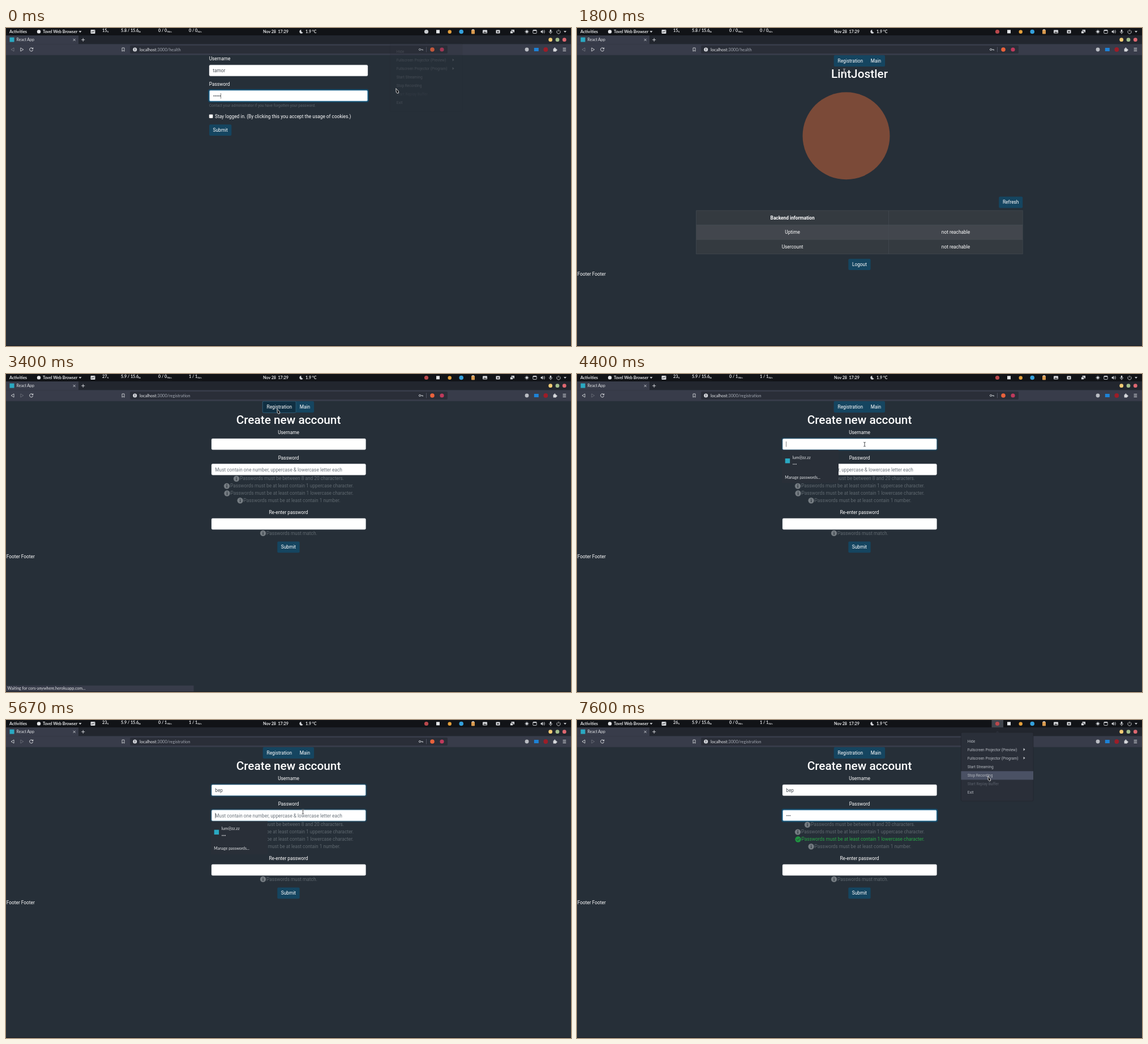
Write an HTML page that moves like this. It is 998 px wide and 561 px high and loops after 7740 ms.

```html
<!DOCTYPE html>
<html lang="en">
<head>
<meta charset="utf-8">
<title>Sign-up walkthrough</title>
<style>
html, body { margin: 0; width: 100%; height: 100%; overflow: hidden; background: #262f38; }
svg { display: block; width: 100vw; height: 100vh; }
text { font-family: Roboto, sans-serif; white-space: pre; }
.ui { font-family: Lato, "Noto Sans", sans-serif; }
.b { font-weight: 700; }
.h { font-weight: 500; }
</style>
</head>
<body>
<svg id="stage" viewBox="0 0 998 561" xmlns="http://www.w3.org/2000/svg"></svg>
<script>
const LOOP = 7740;
const BLUE = '#154560', BLUE_DARK = '#102f42', TEAL = '#2aa9c2', MUTED = '#5f686f', GREEN = '#28a745';

// Markup helpers; text is placed by its vertical centre
const text = (x, cy, s, o = {}) => {
  const size = o.size || 8.32;
  return `<text x="${x}" y="${(cy + size * 0.35).toFixed(2)}" font-size="${size}" fill="${o.fill || '#fff'}"` +
    ` class="${o.cls || ''}" text-anchor="${o.mid ? 'middle' : 'start'}" ${o.id ? `id="${o.id}"` : ''}>${s}</text>`;
};
const ui = (x, cy, s, size, fill = '#e3e5e8', id) => text(x, cy, s, { size, fill, id, cls: 'ui' });
const bold = (x, cy, s, size = 7.2, id) => text(x, cy, s, { size, id, fill: '#e6e7e9', cls: 'ui b' });
const mid = (cy, s, o = {}) => text(499, cy, s, { mid: 1, ...o });
const rect = (x, y, w, h, fill, extra = '') =>
  `<rect x="${x}" y="${y}" width="${w}" height="${h}" fill="${fill}" ${extra}/>`;
const dot = (x, y, r, fill, extra = '') => `<circle cx="${x}" cy="${y}" r="${r}" fill="${fill}" ${extra}/>`;
const line = (d, stroke = '#d5d7db', w = 0.8, extra = '') =>
  `<path d="${d}" fill="none" stroke="${stroke}" stroke-width="${w}" ${extra}/>`;
const shape = (d, fill = '#d5d7db') => `<path d="${d}" fill="${fill}"/>`;
const group = (id, body) => `<g id="${id}">${body}</g>`;

const button = (x, y, w, label, id = '') =>
  rect(x, y, w, 19.8, BLUE, `rx="2" ${id ? `id="${id}"` : ''}`) +
  text(x + w / 2, y + 9.8, label, { mid: 1 });
const ring = (id, x, y, w, h) =>
  `<g id="${id}">` +
  rect(x - 1, y - 1, w + 2, h + 2, 'none', `rx="2.8" stroke="${BLUE}" stroke-width="2"`) +
  rect(x + 0.2, y + 0.2, w - 0.4, h - 0.4, 'none', 'rx="2" stroke="#2a7bab" stroke-width=".8"') + '</g>';
const input = (x, y, w, ringId) =>
  rect(x, y, w, 19.6, '#fff', 'rx="2.1" stroke="#ced4da" stroke-width=".4"') +
  (ringId ? ring(ringId, x, y, w, 19.6) : '');
const bullets = (x, y, n, cls) =>
  Array.from({ length: n }, (_, i) => dot(x + i * 2.75, y, 0.95, '#495057', `class="${cls}"`)).join('');
const caret = (id, y) => rect(0, y, 0.6, 9.6, '#333', `id="${id}"`);
const hint = (x, cy, s, ok) => {
  const mark = ok
    ? line(`M${x - 2.5} ${cy}l1.8 1.9l3.3 -3.6`, '#26313a', 1)
    : rect(x - 0.6, cy - 0.8, 1.3, 3.6, '#262f38') + dot(x, cy - 2.2, 0.8, '#262f38');
  return dot(x, cy, 5.2, ok ? '#1f9440' : '#747b81') + mark +
    text(x + 6, cy - 0.3, s, { fill: ok ? GREEN : MUTED });
};

function chromeBars() {
  const stat = (x, id, unit, unitX) => bold(x, 4.4, '', 7.2, id) + bold(unitX, 6.6, unit, 3.4);
  const top = rect(0, 0, 998, 13.2, '#111317') + rect(732.5, 0, 20.5, 13.2, '#41454d', 'id="trayBg"') +
    bold(6, 6.5, 'Activities', 7.4) + dot(58, 6.4, 3.2, '#e6e7e9') + bold(65, 6.5, 'Tovel Web Browser', 7.1) +
    shape('M128.5 5.2h5l-2.5 3z') +
    rect(149.5, 3, 8, 7, '#d5d7db', 'rx="1"') + line('M151 8l1.6-2 1.4 1.2 2-2.7', '#222', 0.8) +
    stat(170, 'cpu', '%', 178.6) + stat(203, 'mem', 'Gb', 233.5) +
    stat(269, 'disk', 'Mb/s', 284.8) + stat(323, 'net', 'Kb/s', 338.4) +
    bold(454, 6.5, 'Nov 28  17:29', 7.15) +
    shape('M521.5 3a3.4 3.4 0 1 0 3.2 5a3.6 3.6 0 0 1 -3.2 -5z') + bold(529, 6.5, '1.9 °C') +
    dot(742.5, 6.5, 3.6, '#c9ccd0', 'id="tray"') + rect(760, 3.4, 6, 6, '#e4e6e8') +
    dot(783.7, 6.8, 3.2, '#e4a03c') + dot(804.2, 6.5, 3.8, '#34a0db') +
    rect(822, 3, 6, 7.5, '#d99a4e', 'rx=".8"') + rect(823.5, 2.2, 3, 1.7, '#d9dadd') +
    rect(842, 3.4, 8, 6, '#d5d7db', 'rx=".8"') + shape('M843 8.5l2-2.5 1.5 1.5 1.2-1 1.6 2z', '#333') +
    rect(865.5, 3.6, 7, 6, '#d5d7db', 'rx=".8"') + dot(869, 6.8, 1.4, '#222') +
    rect(892.5, 3, 5.5, 4.6, '#d5d7db') + rect(890.5, 5.2, 5, 4.6, '#d5d7db', 'stroke="#111317" stroke-width=".7"') +
    dot(920, 6.5, 2, '#d5d7db') + line('M920 2.7v7.6M916.2 6.5h7.6M917.3 3.8l5.4 5.4M922.7 3.8l-5.4 5.4', '#d5d7db', 0.7) +
    rect(930.8, 3.5, 6.4, 6, 'none', 'rx=".8" stroke="#d5d7db" stroke-width=".9"') + line('M931 4.4h6', '#d5d7db', 1.4) +
    shape('M944.5 5.2h1.5l2-2v6.6l-2-2h-1.5z') + line('M949 4.6q1.6 1.9 0 3.8M950.4 3.4q2.4 3 0 6.2') +
    rect(960.7, 2.7, 2.6, 4.6, '#d5d7db', 'rx="1.3"') + line('M959.4 6q0 2.8 2.6 2.8t2.6-2.8M962 8.8v1.8') +
    line('M974.3 4.2a3.2 3.2 0 1 0 3.4 0M976 2.8v3.4', '#d5d7db', 0.9) + shape('M985 5.3h5l-2.5 2.8z');

  const tabs = rect(0, 13.2, 998, 15.3, '#22262e') + rect(0, 13.2, 128, 15.3, '#383c4a') +
    rect(6.5, 16.6, 8, 8, TEAL) + ui(18.5, 20.6, 'React App', 7.05) +
    line('M118.6 18.9l4 4M122.6 18.9l-4 4', '#e3e5e8') + line('M133.2 20.8h6M136.2 17.8v6', '#e3e5e8', 0.9) +
    dot(961.7, 20.7, 3.4, '#f2cb74') + dot(974, 20.7, 3.4, '#a3be8c') + dot(986.3, 20.7, 3.4, '#dd6770');

  const bar = rect(0, 28.4, 998, 19.4, '#383c4a') + rect(219, 31, 561, 14, '#2a2e38', 'rx="2"') +
    line('M14 35l-5 3l5 3z', '#e3e5e8', 0.8, 'id="back"') + line('M25.8 35l5 3l-5 3z', '#e3e5e8', 0.8, 'id="next"') +
    line('M47 36a3 3 0 1 0 .6 2.6M47.8 34.6v2.2h-2.3', '#e3e5e8', 1) +
    line('M205 35h4v6.2l-2-1.7-2 1.7z', '#e3e5e8', 0.8) +
    dot(227.7, 38, 3.5, '#d9dbe0') + rect(227.2, 35.8, 1, 2.8, '#2a2e38') + rect(227.2, 39.2, 1, 1, '#2a2e38') +
    text(236, 38, 'localhost<tspan fill="#a3a8b2" id="path"></tspan>', { size: 7.5, fill: '#e8eaed', cls: 'ui' }) +
    line('M733 38h3.4v1.6M735 38v1.3', '#c9ccd2', 0.9) + dot(731, 38, 1.6, 'none', 'stroke="#c9ccd2" stroke-width=".9"') +
    line('M742.5 33.5v9', '#6b7080', 0.6) + dot(753, 38, 3.8, '#e9623c') + dot(770, 38, 3.6, '#bf3a5c') +
    dot(920, 38, 3.4, '#b9bcc3') + rect(932.8, 35, 8, 6, '#1d82d6') + dot(953.3, 38, 3.9, '#9c1d28') +
    rect(966.6, 36.2, 5.4, 5.2, '#d5d7db', 'rx=".6"') + dot(969.3, 35.6, 1.2, '#d5d7db') + dot(972.4, 38.8, 1.2, '#d5d7db') +
    line('M983.6 35.6h5.6M983.6 38h5.6M983.6 40.4h5.6', '#e3e5e8', 0.9);
  return top + tabs + bar;
}

function loginPage() {
  return text(358.7, 54.5, 'Username') + input(359, 65.2, 280) + text(365.3, 75.2, 'tamor', { fill: '#495057' }) +
    text(358.7, 99, 'Password') + input(359, 109.7, 280, 'loginRing') + bullets(367.3, 119.8, 5, '') + caret('loginCaret', 115) +
    text(358.7, 136.4, 'Contact your administrator if you have forgotten your password.', { size: 6.66, fill: '#59626a' }) +
    rect(358.8, 152.6, 6.6, 6.4, '#fff', 'rx="1" stroke="#777" stroke-width=".4"') +
    text(369, 155.7, 'Stay logged in. (By clicking this you accept the usage of cookies.)') +
    ring('submitRing', 359, 170.3, 39.3, 19.8) + button(359, 170.3, 39.3, 'Submit', 'submit');
}

function healthPage() {
  const x = 210.7, w = 576.5, split = 550.5;
  const row = (y, fill, a, b, cls) => rect(x, y, w, 25.6, fill, 'stroke="#474e55" stroke-width=".6"') +
    text(380.6, y + 12.6, a, { mid: 1, cls }) + text(669, y + 12.6, b, { mid: 1 });
  return mid(80.5, 'LintJostler', { size: 20.8, cls: 'h' }) + dot(475.5, 190.3, 77, '#7b4a38') +
    button(745.2, 297.6, 42, 'Refresh') +
    row(322, '#343a40', 'Backend information', '', 'b') +
    row(347.6, '#42464d', 'Uptime', 'not reachable') +
    row(373.2, '#343a40', 'Usercount', 'not reachable') +
    line(`M${split} 322v76.8`, '#474e55', 0.6) +
    button(479.3, 407.2, 39.3, 'Logout') + text(0.8, 433.6, 'Footer Footer');
}

function registerPage() {
  const lower = 'Passwords must be at least contain 1 lowercase character.';
  return mid(80.5, 'Create new account', { size: 20.8, cls: 'h' }) +
    mid(103.3, 'Username') + input(363, 114, 272.5, 'userRing') +
    text(369.3, 124, '', { fill: '#495057', id: 'user' }) + caret('userCaret', 119) +
    mid(148, 'Password') + input(363, 158.6, 272.5, 'passRing') +
    text(369.3, 168.6, 'Must contain one number, uppercase &amp; lowercase letter each', { fill: '#6c757d', id: 'holder' }) +
    bullets(370.8, 168.6, 3, 'pw') + caret('passCaret', 163.8) +
    hint(407, 184.8, 'Passwords must be between 8 and 20 characters.') +
    hint(390, 197.6, 'Passwords must be at least contain 1 uppercase character.') +
    group('lowOff', hint(390.5, 210.5, lower)) + group('lowOn', hint(390.5, 210.5, lower, true)) +
    hint(413.6, 223.2, 'Passwords must be at least contain 1 number.') +
    mid(244.2, 'Re-enter password') + input(363, 254.7, 272.5) +
    hint(454, 280.9, 'Passwords must match.') +
    button(479.3, 295.5, 39.3, 'Submit') + text(0.8, 322, 'Footer Footer') +
    group('suggest', rect(362, 134, 100, 58.3, '#292f38') + rect(367.7, 149, 8.4, 8.4, TEAL) +
      ui(380.7, 147.2, 'lum@zz.zz', 7.1) + [382, 384.6, 387.2].map(x => dot(x, 159, 0.85, '#d5d7db')).join('') +
      ui(367.3, 182.4, 'Manage passwords...', 6.9));
}

const MENU_TOP = 29.6, MENU_STEP = 15.1;
function trayMenu() {
  const items = ['Hide', 'Fullscreen Projector (Preview)', 'Fullscreen Projector (Program)',
    'Start Streaming', 'Stop Recording', 'Start Replay Buffer', 'Exit'];
  return rect(678.4, 22, 127.6, 121, '#2a2f39', 'rx="2" stroke="#1f232b" stroke-width=".6"') +
    shape('M739.5 22.2l3.2-3 3.2 3z', '#2a2f39') +
    rect(678.4, 0, 127.6, MENU_STEP, '#4a5164', 'id="pick"') +
    items.map((s, i) => text(689.7, 37.2 + i * MENU_STEP, s, { size: 6.6, fill: i === 5 ? '#5b616c' : '#b4b8bf' })).join('') +
    [1, 2].map(i => shape(`M788.6 ${34.5 + i * MENU_STEP}l3 2.4l-3 2.4z`, '#c4c7cc')).join('');
}

const NAV = rect(453.7, 48, 90.4, 19.9, BLUE, 'rx="2"') + rect(453.7, 48, 58.6, 19.9, BLUE_DARK, 'rx="2" id="navHover"') +
  rect(453.2, 48, 59, 20.3, 'none', 'rx="2" stroke="#2d5c76" stroke-width="1" id="navRing"') +
  text(482.8, 58, 'Registration', { mid: 1 }) + text(528, 58, 'Main', { mid: 1 });

document.getElementById('stage').innerHTML =
  rect(0, 0, 998, 561, '#262f38') + group('login', loginPage()) + group('health', healthPage()) +
  group('register', registerPage()) + group('nav', NAV) + chromeBars() +
  group('status', rect(0, 549.6, 331.5, 11.4, '#383c4a') + ui(2.6, 555, 'Waiting for cors-anywhere.herokuapp.com…', 7.1)) +
  rect(0, 560, 998, 1, '#191c24') + group('menu', trayMenu()) +
  group('arrow', '<path d="M.8 .6L1.2 7.2 3 9.2 5.6 8.6 5.4 5.4z" fill="#1a1c20" stroke="#e8e8e8" stroke-width=".9" stroke-linejoin="round"/>') +
  group('beam', line('M-1.8 -3.6q1.8 0 1.8 .9q0-.9 1.8-.9M0-3v6.2M-1.8 3.8q1.8 0 1.8-.9q0 .9 1.8 .9', '#e4e4e4', 1.6) +
    line('M-1.8 -3.6q1.8 0 1.8 .9q0-.9 1.8-.9M0-3v6.2M-1.8 3.8q1.8 0 1.8-.9q0 .9 1.8 .9', '#3a3d42', 0.8));

const el = {};
document.querySelectorAll('[id]').forEach(n => { el[n.id] = n; });
const pwDots = [...document.querySelectorAll('.pw')];

const show = (n, on) => n.setAttribute('visibility', on ? 'inherit' : 'hidden');
const fade = (n, a) => n.setAttribute('opacity', a.toFixed(3));
const attr = (n, k, v) => n.setAttribute(k, v);
const label = (n, s) => { if (n.textContent !== s) n.textContent = s; };
const clamp = v => Math.max(0, Math.min(1, v));
const within = (t, a, b) => t >= a && t < b;
// Eased on at a, off at b
const pulse = (t, a, b, d = 150) => clamp((t - a) / d) * clamp(1 - (t - b) / d);
const typed = (t, times) => times.filter(k => t >= k).length;

// Pointer stops: time, x, y
const PATH = [[0, 688, 106], [70, 688, 106], [600, 383, 181], [930, 383, 181], [1600, 472, 76], [2380, 472, 76],
  [2530, 478, 61], [4000, 478, 61], [4330, 508, 124], [5200, 508, 124], [5530, 524.5, 162], [5980, 524.5, 162],
  [6330, 743, 5], [6800, 743, 5], [7130, 735, 68], [7330, 725, 98.5], [LOOP, 725, 98.5]];
function pointer(t) {
  const i = Math.max(1, PATH.findIndex(p => p[0] > t));
  const [a, b] = [PATH[i - 1], PATH[i]];
  const k = (t - a[0]) / (b[0] - a[0]), e = k * k * (3 - 2 * k);
  return [a[1] + (b[1] - a[1]) * e, a[2] + (b[2] - a[2]) * e];
}

const STATS = [[0, '15', '5.8 / 15.6', '0 / 0', '0 / 0'], [1870, '27', '5.9 / 15.6', '0 / 0', '1 / 1'],
  [3870, '23', '5.9 / 15.6', '0 / 1', '1 / 1'], [5870, '26', '5.9 / 15.6', '0 / 0', '1 / 1']];

function draw(t) {
  const onLogin = t < 1600, onRegister = t >= 3260;
  show(el.login, onLogin);
  show(el.health, !onLogin && !onRegister);
  show(el.register, onRegister);
  show(el.nav, !onLogin);
  show(el.status, within(t, 3300, 3870));

  const row = STATS.filter(s => t >= s[0]).pop();
  ['cpu', 'mem', 'disk', 'net'].forEach((id, i) => label(el[id], row[i + 1]));
  label(el.path, onRegister ? ':3000/registration' : ':3000/health');
  fade(el.back, onRegister ? 1 : 0.35);
  fade(el.next, onRegister ? 0.3 : 1);

  fade(el.loginRing, 1 - clamp((t - 800) / 150));
  attr(el.loginCaret, 'x', 379.4);
  show(el.loginCaret, within(t, 0, 400));
  attr(el.submit, 'fill', t > 530 && t < 1130 ? BLUE_DARK : BLUE);
  fade(el.submitRing, clamp((t - 800) / 150));

  fade(el.navHover, pulse(t, 2400, 4070));
  fade(el.navRing, pulse(t, 3200, 4270));
  fade(el.userRing, pulse(t, 4330, 5600));
  fade(el.passRing, clamp((t - 5600) / 150));

  const letters = typed(t, [4900, 5050, 5180]);
  label(el.user, 'bep'.slice(0, letters));
  attr(el.userCaret, 'x', 369.4 + letters * 4.6);
  show(el.userCaret, onRegister && within(t, 4330, 5450));

  const keys = typed(t, [5740, 5840, 5940]);
  pwDots.forEach((d, i) => show(d, onRegister && i < keys));
  show(el.holder, onRegister && !keys);
  show(el.lowOff, onRegister && !keys);
  show(el.lowOn, onRegister && keys > 0);
  attr(el.passCaret, 'x', 369.6 + keys * 2.9);
  show(el.passCaret, within(t, 5600, 6540) || within(t, 7070, 7600));

  const first = within(t, 4390, 4900), second = within(t, 5600, 5740);
  show(el.suggest, first || second);
  attr(el.suggest, 'transform', `translate(0 ${second ? 44.7 : 0})`);

  const [x, y] = pointer(t);
  const closing = t < 200, open = clamp((t - 6400) / 130);
  const alpha = closing ? 0.2 * (1 - t / 200) : open;
  fade(el.menu, alpha);
  attr(el.menu, 'transform', `translate(0 ${closing ? 4.3 : 4 * (1 - open)})`);
  const pick = Math.floor((y - MENU_TOP) / MENU_STEP);
  show(el.pick, t > 6800 && pick >= 0);
  attr(el.pick, 'y', MENU_TOP + Math.max(0, pick) * MENU_STEP + 0.3);
  show(el.trayBg, t >= 6330);
  attr(el.tray, 'fill', t < 300 ? '#c9ccd0' : '#b9484c');

  const beam = within(t, 1150, 2390) || within(t, 4230, 6060);
  show(el.beam, beam);
  show(el.arrow, !beam);
  attr(beam ? el.beam : el.arrow, 'transform', `translate(${x.toFixed(2)} ${y.toFixed(2)})`);
}

const start = performance.now();
function tick() {
  draw((performance.now() - start) % LOOP);
  requestAnimationFrame(tick);
}
draw(0);
requestAnimationFrame(tick);
</script>
</body>
</html>
```
